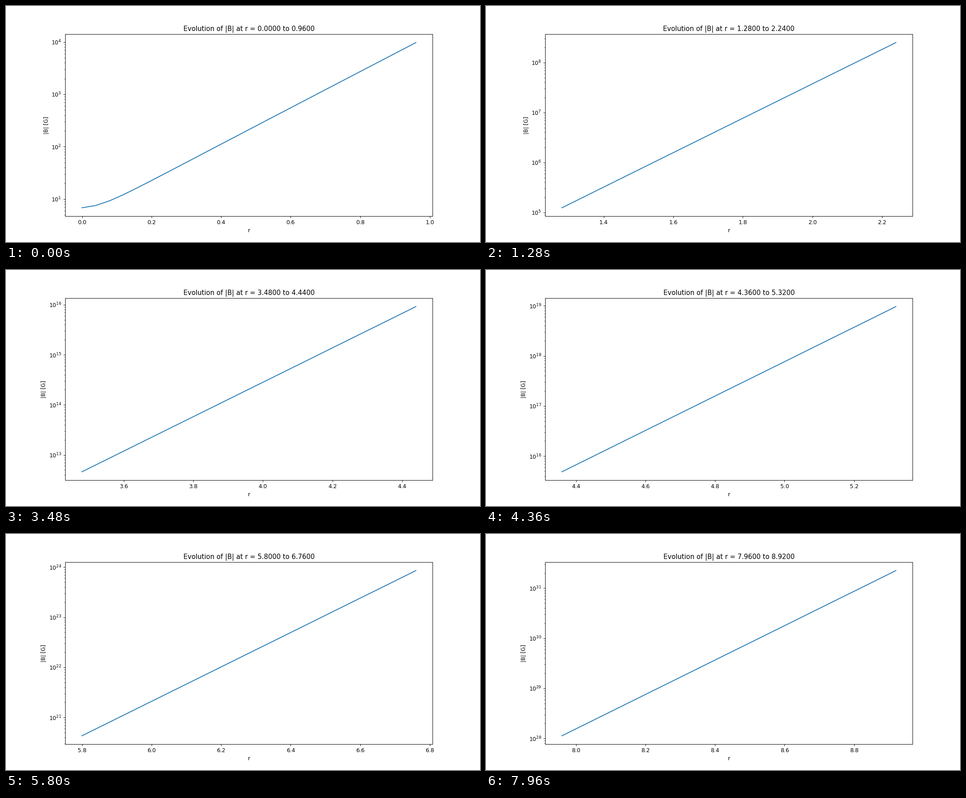
Animation, 1058 px wide and 529 px high, one loop 8 s. Source, as a matplotlib script:

```python
import numpy as np
import matplotlib.pyplot as plt
from matplotlib.animation import FuncAnimation
from matplotlib.ticker import NullFormatter

FRAMES = 200
INTERVAL = 40      # ms
STEP = 0.04        # spacing of samples in r
WINDOW = 25        # samples visible at once


def field(r):
    """Growing mode plus a decaying one, added in quadrature."""
    growing = 10 ** (3.4349 * r + 0.7115 - 0.06 * np.exp(-r / 0.9))
    decaying = 5.09 * np.exp(-4.5 * r)
    return np.hypot(growing, decaying)


# 12 x 6 inches, 1058 x 529 pixels
fig, ax = plt.subplots(figsize=(12, 6), dpi=1058 / 12)
line, = ax.plot([], [])
ax.set_yscale("log")
ax.yaxis.set_minor_formatter(NullFormatter())
ax.set_xlabel("r")
ax.set_ylabel("|B| [G]")


def update(frame):
    r = (frame + np.arange(WINDOW)) * STEP
    line.set_data(r, field(r))
    ax.relim()
    ax.autoscale()
    ax.set_title(f"Evolution of |B| at r = {r[0]:.4f} to {r[-1]:.4f}")
    return line,


anim = FuncAnimation(fig, update, frames=FRAMES, init_func=lambda: update(0),
                     interval=INTERVAL, repeat=True, repeat_delay=0)
plt.show()
```
